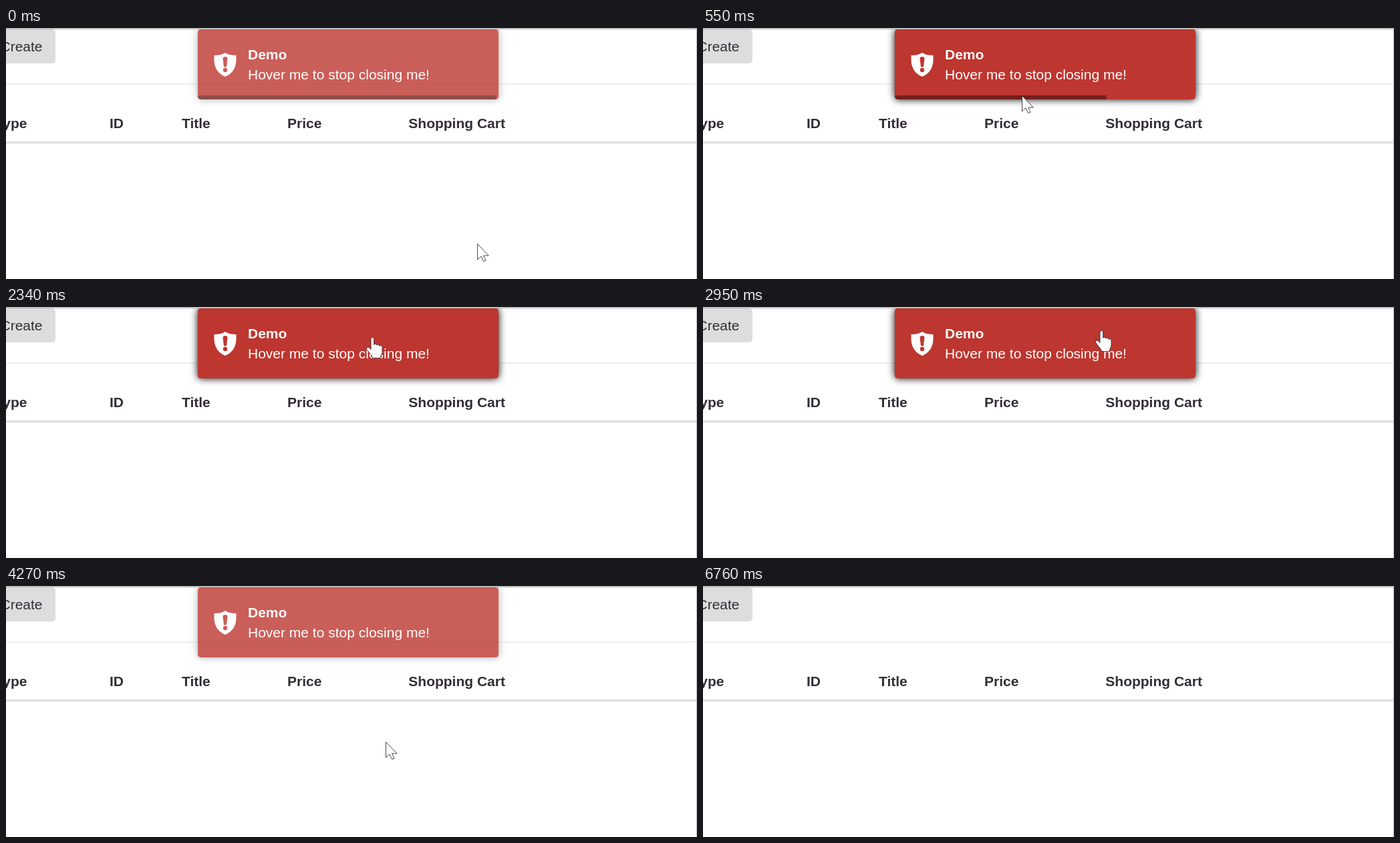
An HTML page for the animation above (7310 ms loop, 1034 by 376 pixels).

```html
<!DOCTYPE html>
<html lang="en">
<head>
<meta charset="utf-8">
<title>Toast hover demo</title>
<style>
  html, body { margin: 0; width: 100%; height: 100%; overflow: hidden; background: #fff; }
  svg { display: block; width: 1034px; height: 376px; }
  text { font: 21px Arial, "Liberation Sans", sans-serif; fill: #332d36; }
  .bold { font-weight: bold; }
  .end { text-anchor: end; }
  #toast { opacity: .8; }
  #toast text { fill: #fff; }
  .card { fill: #bd362f; filter: drop-shadow(0 0 6px #999); }
  #toast.hover { opacity: 1; }
  .hover .card { filter: drop-shadow(0 0 6px #000); }
  #cursor path { fill: #fff; stroke: #1c1c1c; stroke-width: .8; }
</style>
</head>
<body>
<svg viewBox="0 0 1034 376">
  <defs>
    <clipPath id="round"><rect x="287" y="2" width="450" height="105" rx="4.5"/></clipPath>
  </defs>

  <rect x="-40" y="2" width="114" height="51" rx="5" fill="#ddd"/>
  <text class="end" x="54.5" y="35">Create</text>
  <rect y="83" width="1034" height="2" fill="#eee"/>
  <text class="bold end" x="31.5" y="150">Type</text>
  <text class="bold" x="155" y="150">ID</text>
  <text class="bold" x="263" y="150">Title</text>
  <text class="bold" x="421" y="150">Price</text>
  <text class="bold" x="602.3" y="150">Shopping Cart</text>
  <rect y="170" width="1034" height="3" fill="#ddd"/>

  <g id="toast">
    <rect class="card" x="287" y="2" width="450" height="105" rx="4.5"/>
    <path fill="#fff" fill-rule="evenodd" d="M328 37C323 40 318 41 311.5 41V47C311.5 60 317 68 328 73C339 68 344.5 60 344.5 47V41C338 41 333 40 328 37Z
      M324.5 45.5C324.5 42 331.5 42 331.5 45.5L330.2 57C329.8 59 326.2 59 325.8 57Z
      M324.8 63a3.2 3.2 0 1 0 6.4 0a3.2 3.2 0 1 0 -6.4 0Z"/>
    <text class="bold" x="362" y="47">Demo</text>
    <text x="362" y="77">Hover me to stop closing me!</text>
    <g clip-path="url(#round)">
      <rect id="bar" x="287" y="101" width="446" height="6" opacity=".4"/>
    </g>
  </g>

  <rect width="1034" height="1" fill="#d2d2d2"/>
  <rect y="1" width="1034" height="1" fill="#acacac"/>
  <rect x="1033" y="1" width="1" height="375" fill="#b8b8b8"/>

  <g id="cursor">
    <path id="arrow" d="M.5 .5V24L5.8 19L9.6 26.6L13 25.2L9.6 18H17.2Z"/>
    <path id="hand" d="M-1 3C-1 -.2 3.7 -.2 3.7 3V11.5C4 9.5 7.7 9.7 7.8 12.2C8.2 10.5 11.9 10.8 12 13.5C12.5 12 16 12.3 16 15.5V22C16 25.5 13.6 27 13.2 31.5H1.6C1 28 -3 24.5 -7 18.8C-8.6 15.8 -5.3 13.6 -2.8 16.5L-1 18.6Z"/>
  </g>
</svg>
<script>
const LOOP = 7310, CLOSE = 6070;
const BAR_WIDTH = 446, BAR_TIME = 1920;
const HOME = [705, 323], REST = [462, 51];

const bursts = [
  { start: 90, end: 790, steps: 10, via: [446, 112], to: REST },
  { start: 880, end: 1570, steps: 10, via: REST, to: REST },
  { start: 1650, end: 1970, steps: 5, via: REST, to: [462, 50] },
  { start: 2200, end: 2570, steps: 6, via: [572, 47], to: [581, 36] },
  { start: 2800, end: 2950, steps: 3, via: [588, 35], to: [595, 35] },
  { start: 3960, end: 4270, steps: 5, via: [586, 88], to: [568, 233] },
  { start: 6440, end: 6760, steps: 5, via: [800, 340], to: [1045, 345] }
];

const [toast, bar, cursor, arrow, hand] =
  ["toast", "bar", "cursor", "arrow", "hand"].map(id => document.getElementById(id));
const show = (el, on) => { el.style.visibility = on ? "visible" : "hidden"; };
const curve = (a, b, c, u) =>
  a.map((v, i) => (1 - u) ** 2 * v + 2 * u * (1 - u) * b[i] + u * u * c[i]);

// Time of the latest step and the pointer position there.
function stateAt(t) {
  let time = 0, point = HOME;
  for (const { start, end, steps, via, to } of bursts) {
    if (t < start) break;
    const gap = (end - start) / (steps - 1);
    const done = Math.min(steps - 1, Math.floor((t - start + 10) / gap));
    time = start + done * gap;
    point = curve(point, via, to, (done + 1) / steps);
  }
  return { time, point };
}

function draw(t) {
  const { time, point } = stateAt(t);
  const [x, y] = point.map(Math.round);
  const pointing = y < 100;
  cursor.setAttribute("transform", `translate(${x} ${y})`);
  show(arrow, !pointing);
  show(hand, pointing);
  toast.classList.toggle("hover", y < 107);
  show(toast, t < CLOSE);
  bar.setAttribute("width", Math.max(0, BAR_WIDTH * (1 - time / BAR_TIME)));
}

let begin;
function frame(now) {
  begin ??= now;
  draw((now - begin) % LOOP);
  requestAnimationFrame(frame);
}
draw(0);
requestAnimationFrame(frame);
</script>
</body>
</html>
```
